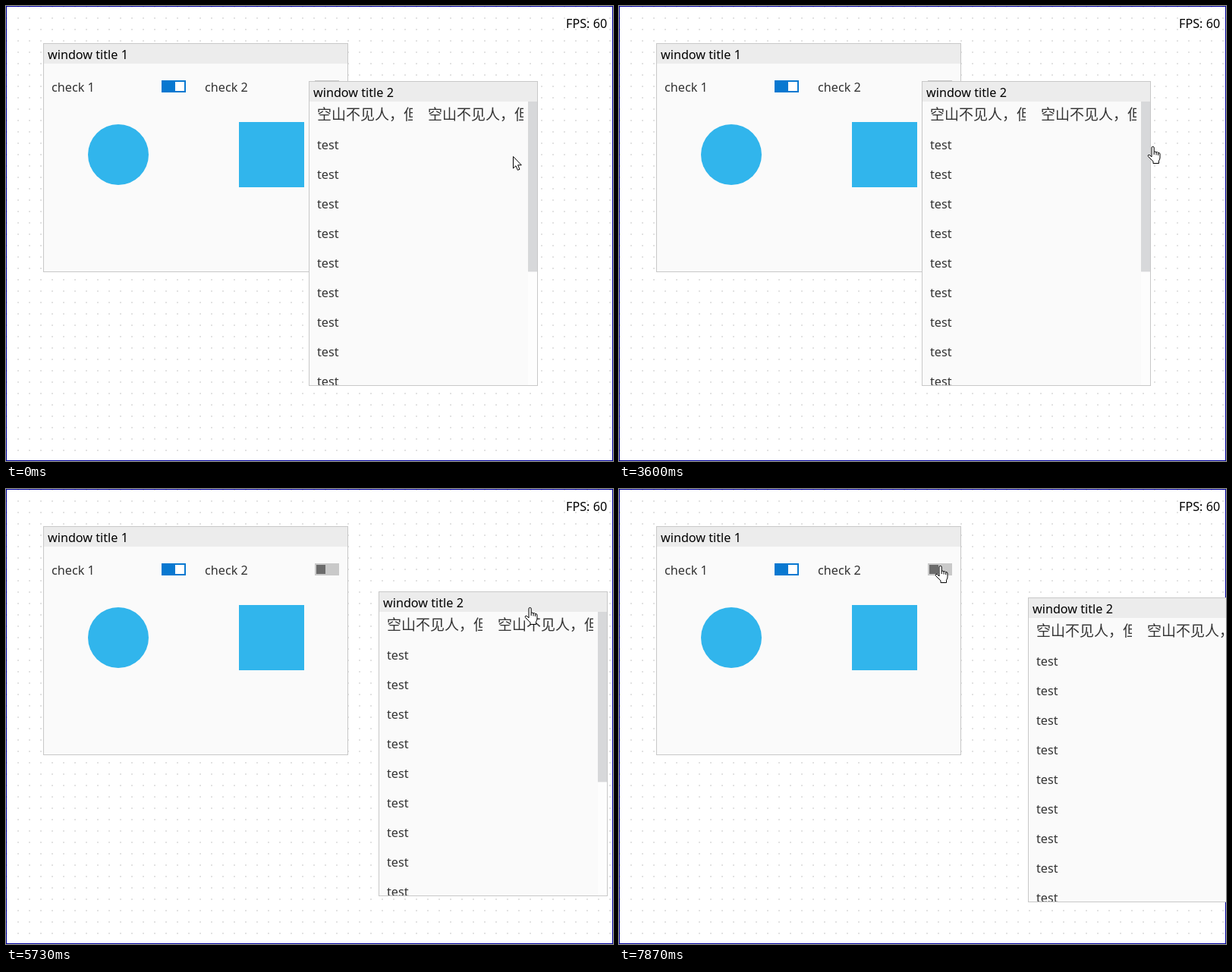
Recreate the animation shown at these times as an HTML page. Size 800 px wide and 600 px high, loop 8000 ms.

```html
<!DOCTYPE html>
<html lang="en">
<head>
<meta charset="utf-8">
<title>Windows demo</title>
<style>
  html, body { margin: 0; width: 100%; height: 100%; overflow: hidden; background: #fff; }
  svg { overflow: hidden; }
  #stage { display: block; }
  text { font: 16.2px "Noto Sans", "Open Sans", sans-serif; fill: #333; }
  .title { fill: #000; }
  .cjk { font: 19px "Noto Sans CJK SC", "Noto Sans CJK", sans-serif; }
  .panel { fill: #fafafa; stroke: #c8c8c8; }
  .bar { fill: #ececec; }
  .icon { fill: #31b5ec; }
  .cursor { fill: #fff; stroke: #000; stroke-linejoin: round; }
</style>
</head>
<body>
<svg id="stage" width="800" height="600" viewBox="0 0 800 600">
  <defs>
    <pattern id="dots" width="15" height="15" patternUnits="userSpaceOnUse">
      <rect width="2" height="2" fill="#e2e2e2"/>
    </pattern>
  </defs>
  <rect width="800" height="600" fill="url(#dots)"/>
  <rect x=".5" y=".5" width="799" height="599" fill="none" stroke="#0000a0"/>
  <text class="title" x="738" y="29">FPS: 60</text>
  <g id="formWindow"></g>
  <g id="listWindow"></g>
  <g id="pointer">
    <path id="arrow" class="cursor" d="M.5.5V16L4 12.8L6.4 18.4L9 17.3L6.6 11.8H11.3Z"/>
    <g id="hand" class="cursor" transform="translate(-7.5 -1)">
      <path d="M5.5 14V2a1.6 1.6 0 0 1 3.2 0V7.5q1.6-1.2 2.9.4q1.6-1 2.6.7q2-.5 2.3 1.4V15q0 2-1.5 4.2v3.3H7.5v-2.6L1 13.5q-1-1.6.5-2.2q1.6-.4 4 2.7Z"/>
      <path fill="none" d="M8.7 7.5V11M11.6 8V11.5M14.2 8.8V12"/>
    </g>
  </g>
</svg>
<script>
  const LOOP = 8000, TICKS_PER_MS = 0.015;
  const HAND_FROM = 3400, GRAB = 5500, RELEASE = 5900;
  const BAR = 26, ROW = 39;
  const $ = id => document.getElementById(id);

  const rect = (x, y, w, h, fill) =>
    `<rect x="${x}" y="${y}" width="${w}" height="${h}" fill="${fill}"/>`;

  const label = (x, y, text, style = "") => `<text class="${style}" x="${x}" y="${y}">${text}</text>`;

  const frame = (w, h, title) =>
    `<rect class="panel" x="-.5" y="-.5" width="${w + 1}" height="${h + 1}"/>
     <rect class="bar" width="${w}" height="${BAR}"/>` + label(5, 20, title, "title");

  const clip = (x, w, h, content) =>
    `<svg x="${x}" y="${BAR}" width="${w}" height="${h}">${content}</svg>`;

  function check(x, name, on) {
    const [track, knob] = on ? ["#0878d0", "#fff"] : ["#c9c9c9", "#6b6b6b"];
    return label(x, 63, name) + rect(x + 145, 48, 32, 16, track) +
      rect(x + (on ? 163 : 147), 50, 12, 12, knob);
  }

  function list(w, h) {
    const poem = label(0, 24, "空山不见人，但", "cjk");
    let rows = "";
    for (let y = 24 + ROW; y < h + ROW; y += ROW) rows += label(10, y, "test");
    return clip(0, w, h, rows) + clip(10, 126, ROW, poem) + clip(156, 126, ROW, poem) +
      rect(w, BAR, 12, h, "#fdfdfd") + rect(w, BAR, 12, h * 0.6, "#d7d8da");
  }

  $("formWindow").innerHTML = frame(400, 300, "window title 1") +
    check(10, "check 1", true) + check(212, "check 2", false) +
    `<circle class="icon" cx="98" cy="146" r="40"/>
     <rect class="icon" x="257" y="103" width="86" height="86"/>`;
  $("listWindow").innerHTML = frame(300, 400, "window title 2") + list(288, 374);

  // Pointer stops; the pointer eases from one to the next.
  const stops = [
    { t: 400, x: 668, y: 198 },
    { t: 1400, x: 575, y: 181 },
    { t: 2800, x: 701, y: 167 },
    { t: 4130, x: 706, y: 196 },
    { t: GRAB, x: 599, y: 121 },
    { t: 5730, x: 691, y: 157 },
    { t: RELEASE, x: 739, y: 165 },
    { t: 6600, x: 382, y: 160 },
    { t: 7300, x: 424, y: 102 }
  ];

  const clamp = (v, low, high) => Math.min(high, Math.max(low, v));
  const ease = k => k * k * (3 - 2 * k);

  function pointerAt(t) {
    const i = clamp(stops.findLastIndex(stop => stop.t <= t), 0, stops.length - 2);
    const a = stops[i], b = stops[i + 1];
    const k = ease(clamp((t - a.t) / (b.t - a.t), 0, 1));
    return { x: Math.round(a.x + (b.x - a.x) * k), y: Math.round(a.y + (b.y - a.y) * k) };
  }

  const place = (id, x, y) => $(id).setAttribute("transform", `translate(${x} ${y})`);
  const show = (id, on) => $(id).style.display = on ? "" : "none";
  const grip = pointerAt(GRAB);
  const start = performance.now();

  function draw() {
    // The screen refreshes 15 times a second.
    const now = (performance.now() - start) % LOOP;
    const t = Math.floor((now + 5) * TICKS_PER_MS) / TICKS_PER_MS;
    const pointer = pointerAt(t), dragged = pointerAt(clamp(t, GRAB, RELEASE));
    place("pointer", pointer.x, pointer.y);
    place("listWindow", 400 + dragged.x - grip.x, 100 + dragged.y - grip.y);
    show("hand", t >= HAND_FROM);
    show("arrow", t < HAND_FROM);
    requestAnimationFrame(draw);
  }

  place("formWindow", 50, 50);
  draw();
</script>
</body>
</html>
```
